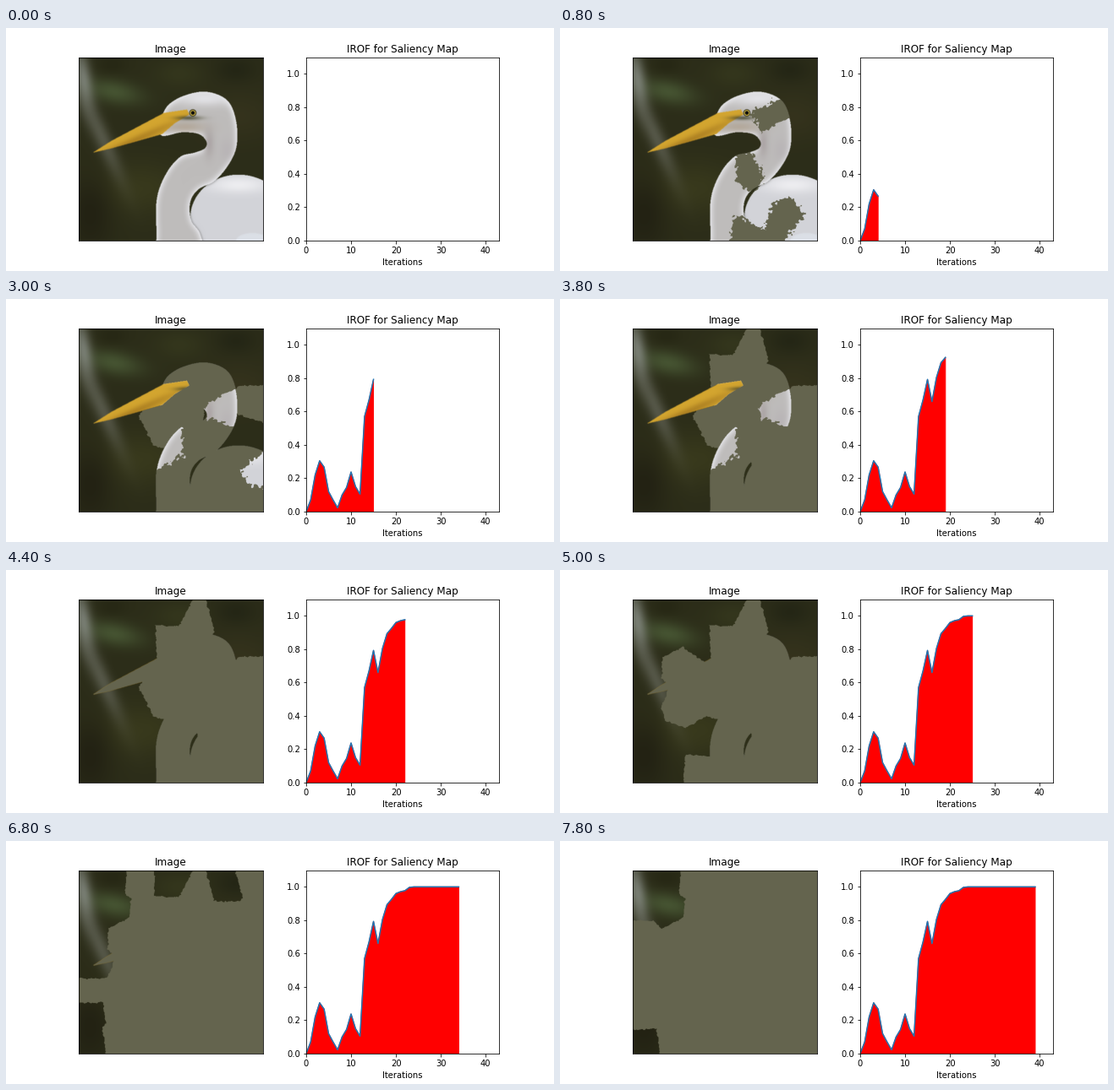
Write a matplotlib script that moves like this. It is 648 by 288 pixels and loops after 8000 ms.

```python
import numpy as np
import matplotlib.pyplot as plt
from matplotlib.animation import FuncAnimation
from matplotlib.path import Path

N_FRAMES, STEP_MS = 40, 200
GREY = (100, 100, 78)

# Stage-pixel coordinates of every photo sample (two per pixel).
SIZE = 436
LEFT, TOP, SPAN = 86.4, 34.56, 217.44
grid = (np.arange(SIZE) + 0.5) / SIZE * SPAN
X, Y = np.meshgrid(LEFT + grid, TOP + grid)


def inside(points):
    samples = np.column_stack([X.ravel(), Y.ravel()])
    return Path(points).contains_points(samples).reshape(X.shape)


def spline(points, n=8):
    """Closed Catmull-Rom curve through the points."""
    b = np.array(points, float)
    a, c, d = (np.roll(b, s, axis=0) for s in (1, -1, -2))
    t = (np.arange(n) / n)[None, :, None]
    a, b, c, d = (p[:, None] for p in (a, b, c, d))
    curve = b + 0.5 * t * (c - a + t * (2 * a - 5 * b + 4 * c - d
                                        + t * (3 * (b - c) + d - a)))
    return curve.reshape(-1, 2)


def blur(values, radius):
    n = int(radius * 6)
    kernel = np.exp(-0.5 * (np.arange(-n, n + 1) / (2 * radius)) ** 2)
    kernel /= kernel.sum()
    out = np.pad(np.asarray(values, float), n, mode="edge")
    for axis in (0, 1):
        out = np.apply_along_axis(np.convolve, axis, out, kernel, mode="valid")
    return out


def blend(img, alpha, colour):
    return img + alpha[..., None] * (np.asarray(colour) - img)


def ellipse(cx, cy, rx, ry, tilt=0.0):
    """Squared distance from the centre, 1 on the rim."""
    c, s = np.cos(tilt), np.sin(tilt)
    u = ((X - cx) * c + (Y - cy) * s) / rx
    v = ((Y - cy) * c - (X - cx) * s) / ry
    return u * u + v * v


def glow(img, shape, colour, strength):
    return blend(img, strength * np.exp(-ellipse(*shape)), colour)


NECK = [(183, 127), (187, 99), (203, 84), (230, 76), (252, 80), (266, 92),
        (273, 117), (272, 143), (262, 164), (246, 182), (228, 191), (218, 206),
        (219, 228), (230, 245), (232, 275), (184, 275), (178, 236), (179, 200),
        (190, 172), (206, 153), (223, 148), (235, 143), (237, 135), (228, 126),
        (208, 124)]
BEAK = [(103, 148), (125, 134), (155, 118), (187, 101), (214, 97), (217, 103),
        (200, 113), (185, 126), (150, 136), (125, 143)]

neck = inside(spline(NECK))
body = ellipse(275, 225, 57, 51) < 1
beak = inside(BEAK)
bird = neck | body


def make_photo():
    img = np.full(X.shape + (3,), (44, 45, 25), float)
    for shape, colour, strength in (
            ((160, 190, 55, 32), (59, 60, 29), 0.8),
            ((275, 105, 45, 30), (56, 53, 30), 0.7),
            ((205, 55, 30, 18), (55, 58, 30), 0.7),
            ((272, 50, 22, 14), (35, 37, 21), 0.8),
            ((100, 220, 26, 45), (34, 33, 19), 0.9),
            ((128, 76, 34, 14, 0.2), (74, 90, 54), 0.85),
            ((92, 62, 10, 38, -0.15), (150, 156, 150), 0.7),
            ((114, 130, 10, 55, -0.42), (112, 114, 102), 0.6),
            ((126, 44, 16, 10), (38, 39, 20), 0.8)):
        img = glow(img, shape, colour, strength)

    back = np.full_like(img, (210, 211, 216))
    back = glow(back, (275, 186, 36, 10), (240, 240, 243), 0.9)
    wing = blur(ellipse(291, 252, 19, 9) < 1, 0.7)
    back = blend(back, 0.8 * wing, (222, 227, 234))
    back = blend(back, 0.9 * blur(neck, 1.5), (95, 95, 92))
    img = blend(img, blur(body, 0.3), back)

    # The neck is brightest along its rim.
    rim = np.clip(1.9 * (1 - blur(neck, 4)), 0, 1)
    plume = blend(np.full_like(img, (190, 188, 187)), rim, (232, 232, 236))
    for shape, colour, strength in (
            ((235, 84, 34, 9), (230, 230, 234), 0.9),
            ((212, 118, 24, 7), (174, 160, 142), 0.7),
            ((240, 137, 6, 16), (166, 158, 158), 0.8),
            ((262, 146, 9, 14), (182, 177, 180), 0.6)):
        plume = glow(plume, shape, colour, strength)
    img = blend(img, blur(neck, 0.3), plume)

    gold = np.full_like(img, (212, 166, 48))
    gold = glow(gold, (150, 135, 60, 5, -0.42), (160, 116, 30), 0.7)
    img = blend(img, blur(beak, 0.4), gold)
    img = glow(img, (216, 107, 15, 2.5), (72, 72, 46), 0.8)
    r = np.hypot(X - 221, Y - 101)
    for radius, colour in ((4.6, (70, 68, 44)), (3.6, (190, 165, 60)), (2.4, (14, 14, 12))):
        img = blend(img, np.clip((radius - r) * 2, 0, 1), colour)
    return np.clip(img, 0, 255).astype(np.uint8)


# Superpixel centres in order of removal.
SEEDS = np.array([
    (228, 175), (248, 104), (266, 224), (212, 243),
    (207, 205), (214, 118), (230, 213), (192, 238), (185, 145), (292, 245),
    (248, 165), (285, 182), (238, 79), (290, 120), (250, 186), (190, 83),
    (278, 160), (226, 68), (300, 200),
    (190, 178), (260, 128), (165, 118), (145, 165), (145, 113), (163, 238),
    (165, 202), (165, 84), (131, 236), (290, 50), (100, 178),
    (262, 86), (160, 50), (290, 86), (133, 202), (262, 58), (192, 50),
    (100, 148), (100, 206), (97, 113),
    (124, 48), (128, 80), (98, 76), (102, 240)])


def superpixels():
    """Nearest centre of the same material, with ragged borders on the bird."""
    rng = np.random.default_rng(4)
    ragged = np.where(bird, 1.6, 0.5)
    noise = [blur(rng.normal(size=X.shape), 1) for _ in range(2)]
    wx, wy = (p + ragged * n / n.std() for p, n in zip((X, Y), noise))
    material = np.where(beak, 2, np.where(bird, 1, 0))
    cols, rows = ((SEEDS - (LEFT, TOP)) / SPAN * SIZE).astype(int).T
    dist = [(wx - x) ** 2 + (wy - y) ** 2 + 1e5 * (material != m)
            for (x, y), m in zip(SEEDS, material[rows, cols])]
    return np.argmin(dist, axis=0)


photo = make_photo()
labels = superpixels()

score = np.ones(N_FRAMES)
score[:24] = [0, 0.07, 0.22, 0.305, 0.267, 0.12, 0.07, 0.023, 0.1, 0.145, 0.238,
              0.15, 0.105, 0.57, 0.67, 0.793, 0.66, 0.805, 0.893, 0.925, 0.96,
              0.971, 0.977, 0.997]

plt.rcParams.update({"font.family": "DejaVu Sans", "font.size": 10})
fig, (ax_img, ax) = plt.subplots(1, 2, figsize=(9, 4), dpi=72)
fig.subplots_adjust(left=0.125, right=0.9, bottom=0.125, top=0.88, wspace=0.2)

ax_img.set_title("Image")
ax_img.set(xticks=[], yticks=[])
picture = ax_img.imshow(photo)

ax.set_title("IROF for Saliency Map")
ax.set_xlabel("Iterations")
ax.set(xlim=(0, len(SEEDS)), ylim=(0, 1.1))
area, = ax.fill([0, 0, 0], [0, 0, 0], color="red", lw=1)
line, = ax.plot([], [], color="C0", lw=1.5)


def update(k):
    shown = photo.copy()
    shown[labels < k] = GREY
    picture.set_data(shown)
    x, y = np.arange(k + 1), score[:k + 1]
    line.set_data(x, y)
    area.set_xy(np.column_stack([np.r_[0, x, k], np.r_[0, y, 0]]))
    area.set_visible(k > 0)
    return picture, line, area


anim = FuncAnimation(fig, update, frames=N_FRAMES, interval=STEP_MS,
                     repeat=True, repeat_delay=0)
plt.show()
```
